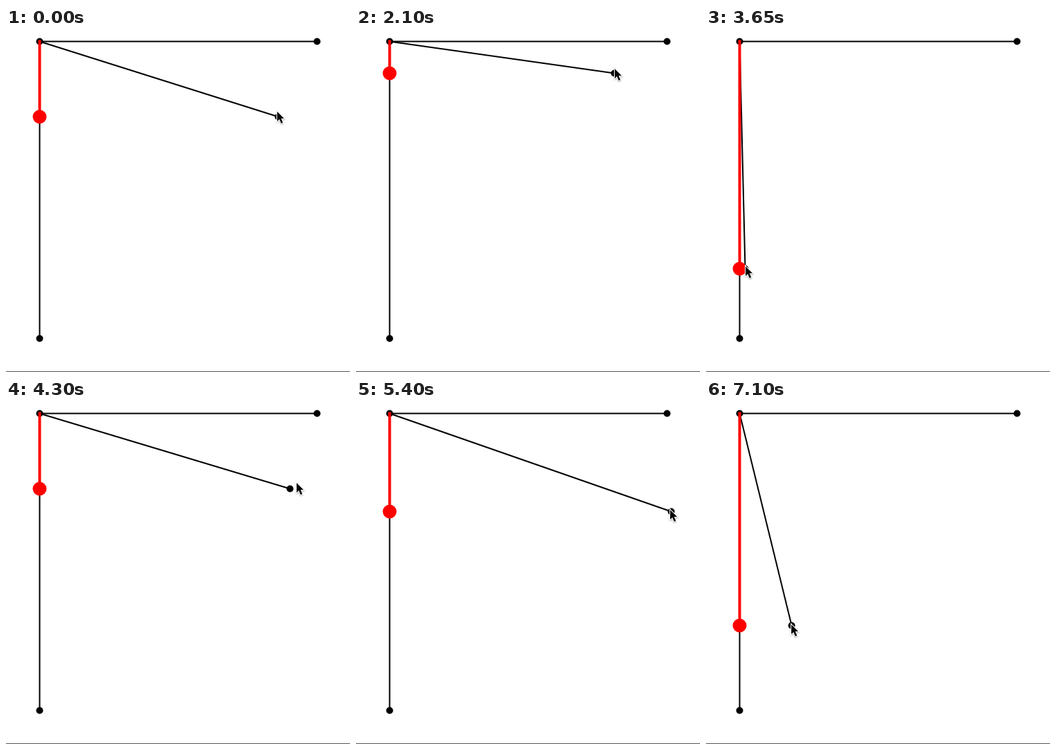
An HTML page with a canvas for the animation above (7400 ms loop, 496 by 498 pixels).

```html
<!DOCTYPE html>
<html lang="en">
<head>
<meta charset="utf-8">
<title>Projection onto the vertical axis</title>
<style>
html, body { margin: 0; width: 100%; height: 100%; overflow: hidden; background: #fff; }
canvas { display: block; }
</style>
</head>
<body>
<canvas id="stage" width="496" height="498"></canvas>
<script>
const ctx = document.getElementById("stage").getContext("2d");
const LOOP = 7400, STEP = 50, LAST = 7100;
const ORIGIN = [48.5, 19.5];

// Pointer path: time, x, y
const path = [
  [-50, 392, 126], [0, 391, 121], [300, 325, 155], [800, 72, 367],
  [1100, 230, 273], [1150, 287, 219], [1300, 342, 128], [1800, 350, 85],
  [2050, 372, 63], [2100, 373, 59], [2250, 377, 75], [3000, 227, 285],
  [3450, 75, 352], [3600, 56, 346], [3650, 57, 345], [4100, 330, 175],
  [4250, 409, 126], [4300, 419, 120], [4550, 330, 200], [4850, 155, 407],
  [5150, 370, 240], [5350, 454, 159], [5400, 453, 159], [5800, 200, 351],
  [6000, 200, 318], [6350, 410, 230], [6600, 295, 344], [6750, 216, 325],
  [7050, 123, 324], [7100, 123, 325]
];

const rate = (i, k) => (path[i + 1][k] - path[i][k]) / (path[i + 1][0] - path[i][0]);

// Tangent that keeps the curve inside its points
function tangent(i, k) {
  if (i === 0) return rate(0, k);
  if (i === path.length - 1) return rate(i - 1, k);
  const a = rate(i - 1, k), b = rate(i, k);
  return a * b > 0 ? 2 * a * b / (a + b) : 0;
}

function pointer(t) {
  let i = 0;
  while (i < path.length - 2 && path[i + 1][0] < t) i++;
  const span = path[i + 1][0] - path[i][0];
  const u = (t - path[i][0]) / span, v = 1 - u;
  return [1, 2].map(k => Math.round(
    path[i][k] * v * v * (1 + 2 * u) + path[i + 1][k] * u * u * (3 - 2 * u) +
    span * u * v * (tangent(i, k) * v - tangent(i + 1, k) * u)));
}

function line(from, to, width, color) {
  ctx.lineWidth = width;
  ctx.strokeStyle = color;
  ctx.beginPath();
  ctx.moveTo(...from);
  ctx.lineTo(...to);
  ctx.stroke();
}

function dot([x, y], radius, color) {
  ctx.fillStyle = color;
  ctx.beginPath();
  ctx.arc(x, y, radius, 0, 2 * Math.PI);
  ctx.fill();
}

const arrow = new Path2D("M0 0V14L3.2 11L5.7 17L8.2 16L5.7 10H10Z");

function drawArrow([x, y]) {
  ctx.save();
  ctx.translate(x, y);
  ctx.shadowColor = "rgba(0,0,0,.35)";
  ctx.shadowBlur = 2;
  ctx.shadowOffsetY = 1;
  ctx.lineWidth = 2;
  ctx.strokeStyle = "#fff";
  ctx.stroke(arrow);
  ctx.shadowColor = "transparent";
  ctx.fillStyle = "#000";
  ctx.fill(arrow);
  ctx.restore();
}

function draw(t) {
  const [hx, hy] = pointer(t - STEP); // the handle trails the pointer
  const handle = [hx + 0.5, hy + 2.5];
  const shadow = [ORIGIN[0], handle[1]];
  const right = [448.5, 19.5], bottom = [48.5, 449.5];

  ctx.fillStyle = "#fff";
  ctx.fillRect(0, 0, 496, 498);
  line([0, 497.5], [496, 497.5], 1, "#555");
  for (const end of [right, bottom, handle]) {
    line(ORIGIN, end, 2, "#000");
    dot(end, 5, "#000");
  }
  dot(ORIGIN, 5, "#000");
  line([ORIGIN[0], 17.5], shadow, 4, "#f00");
  dot(shadow, 10, "#f00");
  drawArrow(pointer(t));
}

function tick() {
  const t = performance.now() % LOOP;
  draw(Math.min(LAST, Math.floor(t / STEP) * STEP));
  requestAnimationFrame(tick);
}
tick();
</script>
</body>
</html>
```
